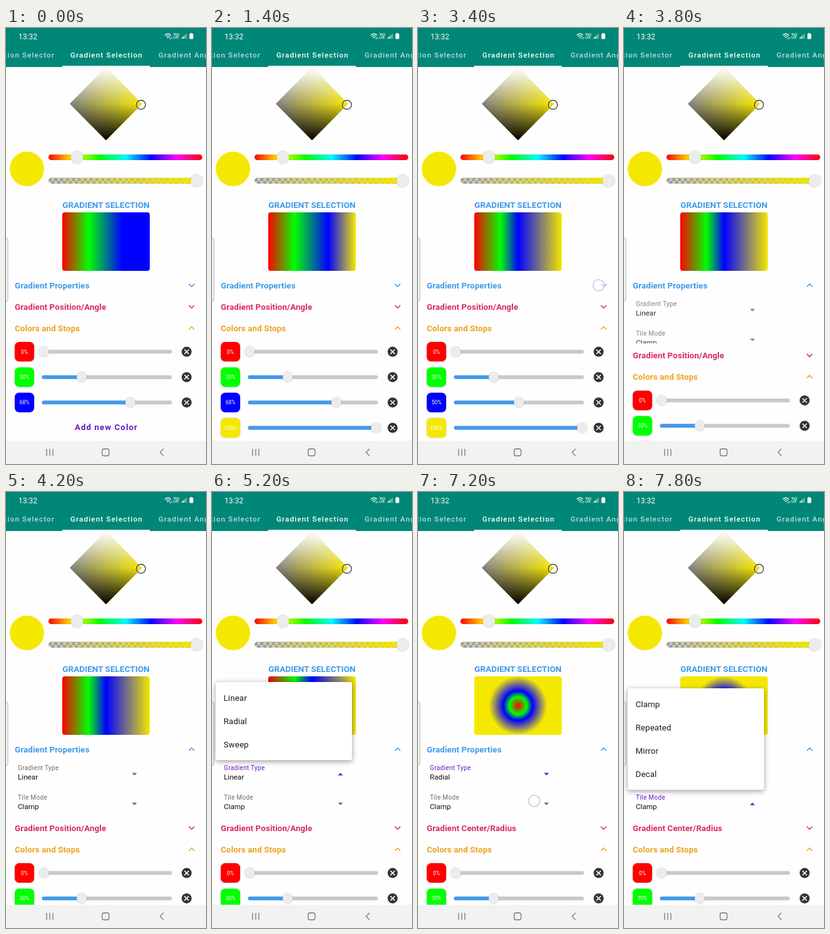
Write an HTML page that moves like this. It is 320 by 693 pixels and loops after 8 s.

```html
<!DOCTYPE html>
<html lang="en">
<head>
<meta charset="utf-8">
<title>Gradient Selection</title>
<style>
html, body { margin: 0; width: 100%; height: 100%; overflow: hidden; background: #fefefe; }
svg { display: block; width: 320px; height: 693px; font-family: Roboto, sans-serif; }
text { white-space: pre; }
.raised { filter: drop-shadow(0 .8px .8px #0004); }
.popup { filter: drop-shadow(0 2px 4px #0006); }
</style>
</head>
<body>
<svg viewBox="0 0 320 693">
  <defs id="paints"></defs>
  <g id="fixed"></g>
  <g id="live"></g>
  <g id="chrome"></g>
  <g id="overlay"></g>
</svg>
<script>
const LOOP = 8000, STEP = 200;
const BLUE = '#3f9aea', PINK = '#d8286b', ORANGE = '#eda31f', PURPLE = '#6a17c9', YELLOW = '#f5e800';
const el = id => document.getElementById(id);

// Drawing helpers
const text = (x, y, s, size, fill, extra = '') =>
  `<text x="${x}" y="${y}" font-size="${size}" fill="${fill}" ${extra}>${s}</text>`;
const rect = (x, y, w, h, r, fill, extra = '') =>
  `<rect x="${x}" y="${y}" width="${w}" height="${h}" rx="${r}" fill="${fill}" ${extra}/>`;
const circle = (x, y, r, fill, extra = '') =>
  `<circle cx="${x}" cy="${y}" r="${r}" fill="${fill}" ${extra}/>`;
const line = (d, color, width) =>
  `<path d="${d}" fill="none" stroke="${color}" stroke-width="${width}"/>`;
const thumb = (x, y, r) => circle(x, y, r, '#ececec', 'class="raised"');
const stops = list => list.map(([at, color]) => `<stop offset="${at}" stop-color="${color}"/>`).join('');
const linear = (id, list, attrs = '') => `<linearGradient id="${id}" ${attrs}>${stops(list)}</linearGradient>`;

function drawFixed() {
  const hues = Array.from({ length: 7 }, (_, i) => [i / 6, `hsl(${i * 60} 96% 50%)`]);
  el('paints').innerHTML =
    linear('hue', hues) +
    linear('saturation', [[0, '#808080'], [1, YELLOW]]) +
    linear('lightness', [[0, '#fff'], [.5, '#fff0'], [.5, '#0000'], [1, '#000']], 'x2="0" y2="1"') +
    linear('alpha', [[0, '#f5e80000'], [1, YELLOW]]) +
    `<pattern id="checker" x="68" y="238.5" width="9.4" height="9.4" patternUnits="userSpaceOnUse">
      ${rect(0, 0, 9.4, 9.4, 0, '#c9c9c9')}<path d="M0 0h4.7v9.4h4.7v-4.7H0z" fill="#989898"/></pattern>`;

  const diamond = 'M160 62.5L218 120.5L160 178.5L102 120.5Z';
  el('fixed').innerHTML =
    `<path d="${diamond}" fill="url(#saturation)"/><path d="${diamond}" fill="url(#lightness)"/>` +
    circle(216, 122, 6.2, 'none', 'stroke="#fff" stroke-width="1.2"') +
    circle(216, 122, 7.2, 'none', 'stroke="#222" stroke-width="1.2"') +
    circle(33.5, 224, 27.5, YELLOW) +
    rect(68, 201, 246, 9, 4.5, 'url(#hue)') + thumb(113.5, 205.5, 9.8) +
    rect(68, 238, 246, 9.4, 4.7, 'url(#checker)') + rect(68, 238, 246, 9.4, 4.7, 'url(#alpha)') +
    thumb(305, 243, 9.8) +
    text(160, 285.5, 'GRADIENT SELECTION', 13.6, BLUE, 'font-weight="700" text-anchor="middle"');

  const tab = (x, s, fill, extra = '') =>
    text(x, 47, s, 11.7, fill, `font-weight="500" letter-spacing="1.1" ${extra}`);
  const bars = [0, 1, 2, 3].map(i => rect(281 + i * 2.2, 15 - i * 1.9, 1.5, 2 + i * 1.9, 0, i < 2 ? '#fff' : '#fff8'));
  el('chrome').innerHTML =
    rect(0, 0, 320, 62, 0, '#018778') + rect(90, 60, 140, 2, 0, '#fff') +
    text(20, 17.5, '13:32', 12, '#fff') +
    tab(78, 'Color Selection Selector', '#ffffffb8', 'text-anchor="end"') +
    tab(103, 'Gradient Selection', '#fff') + tab(244, 'Gradient Angle', '#ffffffb8') +
    line('M254 11.5q5-4.5 10 0M256 13.7q3-2.6 6 0', '#fff', 1.2) + circle(259, 15.6, 1, '#fff') +
    line('M262.5 14v4M265 18v-4', '#fff', .8) +
    text(268, 12, 'Vo))', 5, '#fff', 'font-weight="700"') + text(268, 17.3, 'LTE', 5, '#fff', 'font-weight="700"') +
    bars.join('') + rect(293.5, 9, 6, 8.5, 1, '#fff') + rect(295, 8, 3, 2, 0, '#fff') +
    rect(-6, 333.5, 9, 101, 3, '#f4f4f4', 'stroke="#b5b5b5"') +
    rect(0, 656, 320, 37, 0, '#f2f2f2') +
    line('M65 669v11M70 669v11M75 669v11', '#777', 1.3) +
    rect(153.8, 669, 11, 11, 3, 'none', 'stroke="#777" stroke-width="1.3"') +
    line('M252 669l-5.5 5.5l5.5 5.5', '#777', 1.3);
}

function section(y, title, color, open) {
  const d = open ? 2.2 : -2.2;
  return text(14, y + 5, title, 13.35, color, 'font-weight="700" letter-spacing=".12"') +
    line(`M292.7 ${y + d}l4.3 ${-2 * d}l4.3 ${2 * d}`, color, 1.6);
}

function field(y, label, value, focused, open) {
  const color = focused ? PURPLE : '#6b6b6b', d = open ? -2 : 2;
  return text(19, y - 6.5, label, 10, color, 'letter-spacing=".35"') +
    text(19, y + 8, value, 11.7, '#111') +
    `<path d="M201.5 ${y - d}h8l-4 ${2 * d}z" fill="${color}"/>`;
}

const sliderX = value => 60.5 + 2.02 * value;

function colorRow(y, [value, color]) {
  const x = sliderX(value);
  return rect(14, y - 15.5, 31, 31, 7, color, 'class="raised"') +
    text(29.5, y + 3, Math.floor(value) + '%', 8.4, '#fff', 'text-anchor="middle"') +
    rect(57.5, y - 3, 208, 6, 3, '#c9c9c9') +
    (value ? rect(57.5, y - 3, x - 57.5, 6, 3, '#4499ec') : '') + thumb(x, y, 8) +
    circle(289, y, 8, '#333') +
    line(`M285.5 ${y - 3.5}l7 7m0-7l-7 7`, '#fff', 1.5);
}

function popup(y, items, grow) {
  if (!grow) return '';
  const height = items.length * 37.3 + 12.4, scale = .8 + .2 * grow;
  return `<g opacity="${grow}" transform="translate(6 ${y + height}) scale(${scale}) translate(-6 ${-y - height})">` +
    rect(6, y, 218, height, 3.3, '#fff', 'class="popup"') +
    items.map((s, i) => text(18.5, y + 29.5 + i * 37.3, s, 13.35, '#1c1c1c', 'letter-spacing=".12"')).join('') + '</g>';
}

// Value of a stepped track that begins at `start` and holds its last entry
const track = (t, start, values) =>
  values[Math.max(0, Math.min(values.length - 1, Math.floor((t - start) / STEP) + 1))];
const between = (t, a, b) => t >= a && t < b;

function drawLive(t) {
  const blueStop = track(t, 2000, [68.5, 68.5, 63, 57, 51, 50]);
  const expand = track(t, 3600, [0, .35, .85, 1]);
  const typeMenu = t < 6000 ? track(t, 4800, [0, .6, 1]) : 0;
  const tileMenu = track(t, 7400, [0, .6, 1]);
  const radial = t >= 6000;
  const colors = [[0, '#f00'], [30, '#0f0'], [blueStop, '#00f']];
  if (t >= 1200) colors.push([100, YELLOW]);

  const ramp = stops(colors.map(([value, color]) => [value / 100, color]));
  const shift = 91 * expand;
  const fill = radial
    ? `<radialGradient id="ramp" gradientUnits="userSpaceOnUse" cx="160" cy="339.5" r="46.5">${ramp}</radialGradient>`
    : `<linearGradient id="ramp">${ramp}</linearGradient>`;

  el('live').innerHTML = fill + rect(90, 293, 140, 93, 4, 'url(#ramp)') +
    section(409, 'Gradient Properties', BLUE, expand > 0) +
    `<clipPath id="reveal">${rect(0, 424, 320, shift, 0, '#000')}</clipPath>
     <g clip-path="url(#reveal)" opacity="${expand}">` +
    field(448.5, 'Gradient Type', radial ? 'Radial' : 'Linear', between(t, 4800, 7400), typeMenu > 0) +
    field(495.8, 'Tile Mode', 'Clamp', t >= 7400, tileMenu > 0) + '</g>' +
    section(443 + shift, radial ? 'Gradient Center/Radius' : 'Gradient Position/Angle', PINK, false) +
    section(477 + shift, 'Colors and Stops', ORANGE, true) +
    colors.map((c, i) => colorRow(514.6 + i * 40.3 + shift, c)).join('') +
    text(160.5, 518 + colors.length * 40.3 + shift, 'Add new Color', 13.35, PURPLE,
      'font-weight="700" letter-spacing="1.05" text-anchor="middle"');

  const touches = [
    [1000, 1200, 160, 634], [2000, 2800, sliderX(blueStop), 595], [3400, 3600, 289, 409],
    [4600, 4800, 190, 447], [5800, 6000, 72, 364], [7200, 7400, 186, 491]
  ];
  const touch = touches.find(([from, to]) => between(t, from, to));
  el('overlay').innerHTML =
    popup(302, ['Linear', 'Radial', 'Sweep'], typeMenu) +
    popup(312, ['Clamp', 'Repeated', 'Mirror', 'Decal'], tileMenu) +
    (touch ? circle(touch[2], touch[3], 9, '#ffffffa0', 'stroke="#c5cbe0" stroke-width="1.6"') : '');
}

let shown = -1;
function tick() {
  const t = Math.floor(performance.now() % LOOP / STEP) * STEP;
  if (t !== shown) drawLive(shown = t);
  requestAnimationFrame(tick);
}
drawFixed();
tick();
</script>
</body>
</html>
```
